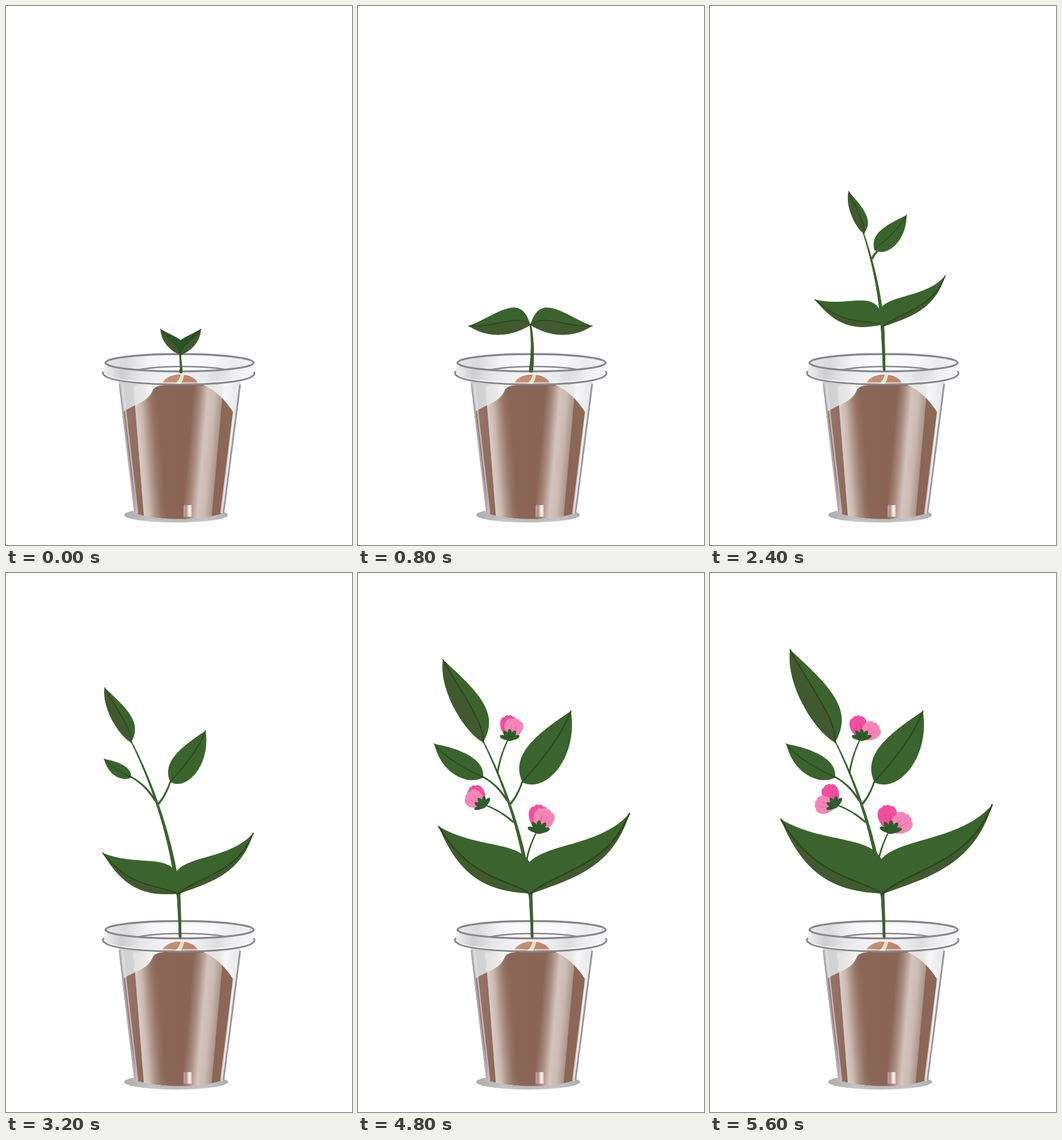
Animation of 600 by 933 pixels, one loop 6.4 s. Source, as an HTML page with a canvas:

```html
<!DOCTYPE html>
<html lang="en">
<head>
<meta charset="utf-8">
<title>Growing plant</title>
<style>
html, body { margin: 0; width: 100%; height: 100%; overflow: hidden; background: #fff; }
canvas { display: block; width: 100vw; height: 100vh; }
</style>
</head>
<body>
<canvas id="stage" width="600" height="933"></canvas>
<script>
const ctx = document.getElementById('stage').getContext('2d');
const STEP = 800, STAGES = 8, GROWTH = 27;
const GREEN = '#3b632e', OLIVE = '#41592f', VEIN = '#2b471a', CALYX = '#2f5b2b';
const LIGHT = '#f486b7', DEEP = '#ee4f9f';
const rad = degrees => degrees * Math.PI / 180;

// Bezier handles of both edges in leaf space: base at (0,0), tip at (1,0).
// The midrib lies between the edges; `rib` is its share of the upper one.
const SHAPES = {
  sprout: { up: [.15, .55, .55, .16], low: [.25, -.16, .65, -.24], rib: .5, underside: OLIVE },
  lowRight: { up: [.12, .48, .55, -.08], low: [.3, -.1, .62, -.26], rib: .2, underside: OLIVE },
  lowLeft: { up: [.22, .5, .5, .05], low: [.28, -.18, .55, -.28], rib: .22, underside: OLIVE },
  top: { up: [.2, .3, .5, .2], low: [.15, -.12, .7, -.2], rib: .55, underside: OLIVE },
  right: { up: [.18, .3, .55, .18], low: [.03, -.3, .6, -.38], rib: .5, underside: GREEN },
  small: { up: [.15, .28, .6, .18], low: [.12, -.25, .6, -.36], rib: .45, underside: GREEN }
};

const FLOWERS = [
  { root: [242, 346], head: [261, 286], bend: [246, 318], turn: 0, size: 1, side: 1 },
  { root: [269, 431], head: [219, 401], bend: [248, 412], turn: -36, size: .97, side: -1 },
  { root: [292, 500], head: [311, 446], bend: [296, 474], turn: 3, size: 1.13, side: 1 }
];

function leaf(shape, side, x, y, degrees, length, color = GREEN) {
  const { up, low, rib, underside } = shape;
  const vein = up.map((v, i) => low[i] + (v - low[i]) * rib);
  const blade = (edge, fill) => {
    ctx.beginPath();
    ctx.moveTo(0, 0);
    ctx.bezierCurveTo(...edge, 1, 0);
    ctx.bezierCurveTo(low[2], low[3], low[0], low[1], 0, 0);
    ctx.fillStyle = fill;
    ctx.fill();
  };
  ctx.save();
  ctx.translate(x, y);
  ctx.scale(side, 1);
  ctx.rotate(-rad(degrees));
  ctx.scale(length, -length);
  blade(up, color);
  if (underside !== GREEN) blade(vein, underside);
  ctx.beginPath();
  ctx.moveTo(0, 0);
  ctx.bezierCurveTo(...vein, 1, 0);
  ctx.strokeStyle = VEIN;
  ctx.lineWidth = .8 / length + .008;
  ctx.stroke();
  ctx.restore();
}

// Quadratic curve whose width runs from w0 to w1.
function stem([x0, y0], [cx, cy], [x1, y1], w0, w1) {
  const n = 30;
  const mix = (a, b, c, t) => a * (1 - t) ** 2 + 2 * b * t * (1 - t) + c * t * t;
  const at = t => [mix(x0, cx, x1, t), mix(y0, cy, y1, t)];
  ctx.strokeStyle = GREEN;
  ctx.lineCap = 'round';
  for (let i = 0; i < n; i++) {
    ctx.lineWidth = w0 + (w1 - w0) * i / n;
    ctx.beginPath();
    ctx.moveTo(...at(i / n));
    ctx.lineTo(...at((i + 1) / n));
    ctx.stroke();
  }
}

function ellipse(x, y, rx, ry, from = 0, to = Math.PI * 2) {
  ctx.beginPath();
  ctx.ellipse(x, y, rx, ry, 0, from, to);
}

function petal(degrees, length, half, color, crease) {
  const bumps = 4;
  const edge = i => [half * (2 * i / bumps - 1), -length * (.78 + .17 * Math.sin(Math.PI * i / bumps))];
  ctx.save();
  ctx.rotate(rad(degrees));
  ctx.fillStyle = color;
  ctx.beginPath();
  ctx.moveTo(0, 0);
  ctx.bezierCurveTo(-half * .7, -length * .15, -half * 1.3, -length * .5, ...edge(0));
  for (let i = 1; i <= bumps; i++) {
    const [px, py] = edge(i - .5);
    ctx.quadraticCurveTo(px, py - length * .09, ...edge(i));
  }
  ctx.bezierCurveTo(half * 1.3, -length * .5, half * .7, -length * .15, 0, 0);
  ctx.fill();
  ctx.strokeStyle = crease;
  ctx.lineWidth = .7;
  for (const k of [-.3, .3]) {
    ctx.beginPath();
    ctx.moveTo(k * half * .6, -length * .4);
    ctx.lineTo(k * half, -length * .65);
    ctx.stroke();
  }
  ctx.restore();
}

function calyx(size) {
  ctx.fillStyle = CALYX;
  for (let a = -70; a <= 70; a += 35) {
    ctx.save();
    ctx.rotate(rad(a));
    ellipse(0, -size * .58, size * .23, size * .55);
    ctx.fill();
    ctx.restore();
  }
  ellipse(0, -size * .12, size * .5, size * .3);
  ctx.fill();
}

function bud() {
  ctx.translate(0, 3);
  ctx.rotate(.2);
  ctx.fillStyle = LIGHT;
  for (let a = 0; a < 360; a += 45) {
    ellipse(1 + Math.cos(rad(a)) * 4.5, -12 + Math.sin(rad(a)) * 4.5, 4, 4);
    ctx.fill();
  }
  calyx(10.5);
}

function blossom(open) {
  ctx.translate(2, 2);
  petal(open ? -13 : -3, 43, 14, DEEP, '#d93c8b');
  petal(open ? 48 : 18, 39, 15, LIGHT, DEEP);
  calyx(16);
}

function flower({ root, head, bend, turn, size, side }, s) {
  const budding = s === 5, reach = budding ? .66 : 1;
  const grown = p => p.map((v, i) => root[i] + (v - root[i]) * reach);
  const end = grown(head), scale = budding ? 1 : size;
  stem(root, grown(bend), end, 3, 2);
  ctx.save();
  ctx.translate(...end);
  ctx.rotate(rad(turn));
  ctx.scale(side * scale, scale);
  budding ? bud() : blossom(s === 7);
  ctx.restore();
}

function sprout(s) {
  const opened = s === 1;
  const y = opened ? 552 : 604, color = opened ? GREEN : '#2b5228';
  stem([opened ? 300 : 303, 631], [305, y + 38], [299 + 3 * !opened, y], opened ? 7 : 5, 3);
  for (const side of [-1, 1]) {
    leaf(SHAPES.sprout, side, opened ? 299 : 303, y, opened ? -1 : 52, opened ? 107 : 57, color);
  }
}

function plant(s) {
  const length = (from, start, max) => Math.min(max, start + GROWTH * (s - from));
  const angle = (start, max) => Math.min(max, start + 8 * (s - 2));
  const young = s === 3, lower = length(0, 60, 246);

  stem([302, 630], [301, 590], [299, 553], 4.5, 6);
  if (young) {
    stem([299, 553], [293, 475], [266, 393], 6.5, 2);
    stem([281, 437], [285, 430], [290, 424], 3.5, 3);
  } else if (s > 3) {
    stem([299, 556], [281, 420], [217, 291], 7.5, 2);
    stem([258, 393], [242, 367], [217, 353], 3.5, 2.5);
    stem([264, 400], [277, 385], [285, 361], 3.5, 2.5);
  }

  leaf(SHAPES.lowLeft, -1, 300, 555 - 4 * young, angle(12, 36), lower * .89);
  leaf(SHAPES.lowRight, 1, 298, 556, angle(31, 39), lower);
  if (young) {
    leaf(SHAPES.top, -1, 267, 394, 70, 78);
    leaf(SHAPES.right, 1, 285, 422, 47, 82);
  } else if (s > 3) {
    leaf(SHAPES.top, -1, 217, 293, 64, length(3, 78, 178));
    leaf(SHAPES.right, 1, 285, 362, 55.6, length(3, 81, 149));
    leaf(SHAPES.small, -1, 217, 354, 34.5, length(4, 57, 103));
  }
  if (s > 4) FLOWERS.forEach(f => flower(f, s));
}

// Evenly spaced colours from x0 to x1; a number is a grey level.
function shades(x0, x1, ...colors) {
  const g = ctx.createLinearGradient(x0, 0, x1, 0);
  colors.forEach((c, i) => g.addColorStop(i / (colors.length - 1), typeof c === 'number' ? `rgb(${c},${c},${c + 2})` : c));
  return g;
}

// Slanted reflection, given by the opacity across its width.
function gleam(x0, x1, slant, ...alphas) {
  ctx.save();
  ctx.transform(1, 0, slant, 1, -slant * 657, 0);
  ctx.fillStyle = shades(x0, x1, ...alphas.map(a => `rgba(236,230,226,${a})`));
  ctx.fillRect(x0, 657, x1 - x0, 240);
  ctx.restore();
}

function wall(xTop, xBottom, color, width) {
  ctx.beginPath();
  ctx.moveTo(xTop, 655);
  ctx.lineTo(xBottom, 878);
  ctx.strokeStyle = color;
  ctx.lineWidth = width;
  ctx.stroke();
}

function arc(x, y, rx, ry, color, width, from, to) {
  ellipse(x, y, rx, ry, from, to);
  ctx.strokeStyle = color;
  ctx.lineWidth = width;
  ctx.stroke();
}

function soil() {
  ctx.beginPath();
  ctx.moveTo(201, 704);
  ctx.bezierCurveTo(222, 688, 246, 688, 255, 664);
  ctx.quadraticCurveTo(259, 657, 275, 656);
  ctx.lineTo(342, 656);
  ctx.quadraticCurveTo(370, 667, 394, 703);
  ctx.lineTo(374, 880);
  ctx.quadraticCurveTo(300, 897, 227, 880);
  ctx.fillStyle = shades(200, 396, '#97776a', '#8b6656', '#8a6555', '#8a6555', '#8d6959');
  ctx.fill();
}

function seed() {
  ctx.save();
  ctx.beginPath();
  ctx.rect(265, 632, 75, 23);
  ctx.clip();
  ellipse(302, 656, 31, 18);
  ctx.fillStyle = shades(271, 333, '#c59179', '#b8846d');
  ctx.fill();
  ctx.beginPath();
  ctx.moveTo(291, 656);
  ctx.quadraticCurveTo(301, 648, 303, 638);
  ctx.lineTo(309, 638);
  ctx.quadraticCurveTo(307, 650, 301, 656);
  ctx.fillStyle = '#efe2ce';
  ctx.fill();
  ctx.restore();
}

function cup() {
  const rim = [301, 617.5, 128.5, 15], rimGrey = '#88868d';
  ellipse(295, 881, 90, 13);
  ctx.fillStyle = shades(205, 385, 172, 196, 187, 196, 176);
  ctx.fill();

  ctx.save();
  ctx.beginPath();
  ctx.moveTo(195, 648);
  ctx.lineTo(222, 878);
  ctx.quadraticCurveTo(300, 900, 378, 878);
  ctx.lineTo(407, 648);
  ctx.fillStyle = shades(195, 407, 205, 212, 244, 249, 249, 240, 222, 246, 228);
  ctx.fill();
  ctx.clip();
  soil();
  gleam(221, 261, .08, .8, .65, .35, .1, 0);
  gleam(326, 377, -.09, 0, .3, .75, .65, .35);
  ctx.fillStyle = shades(307, 323, 'rgba(235,225,218,.6)', 'rgba(215,195,184,.35)', '#fdfaf8', 'rgba(235,225,220,.6)');
  ctx.fillRect(308, 864, 14, 20);
  ctx.restore();

  wall(197, 224, '#a9a8ae', 3);
  wall(202, 228, 'rgba(235,235,238,.6)', 2.5);
  wall(406, 377, '#98979e', 3);
  wall(401, 373, 'rgba(238,238,241,.75)', 3);
  arc(300, 877, 77, 12, '#bdbabc', 2, .1, Math.PI - .1);

  // Collar
  ctx.beginPath();
  ctx.moveTo(172, 618);
  ctx.lineTo(168, 641);
  ctx.bezierCurveTo(190, 661, 408, 661, 430, 641);
  ctx.lineTo(431, 618);
  ctx.fillStyle = shades(166, 432, 244, 206, 230, 240, 242, 238, 222, 240, 247);
  ctx.fill();
  seed();

  // Rim with the far wall seen through it
  ellipse(...rim);
  ctx.fillStyle = shades(172, 431, 230, 218, 244, 250, 250, 248, 236, 242);
  ctx.fill();
  ctx.save();
  ctx.clip();
  arc(306, 634, 84, 10, rimGrey, 2.5, Math.PI, Math.PI * 2);
  ctx.restore();
  arc(...rim, rimGrey, 3.4);

  ctx.beginPath();
  ctx.moveTo(169, 633);
  ctx.bezierCurveTo(150, 661, 448, 664, 430, 633);
  ctx.strokeStyle = rimGrey;
  ctx.lineWidth = 3;
  ctx.stroke();
  arc(299, 636, 128, 16.5, 'rgba(252,252,253,.75)', 1.8, .3, Math.PI - .3);
}

function draw(s) {
  ctx.fillStyle = '#fff';
  ctx.fillRect(0, 0, 600, 933);
  cup();
  s < 2 ? sprout(s) : plant(s);
}

let shown = -1;
function tick() {
  const s = Math.floor(performance.now() / STEP) % STAGES;
  if (s !== shown) draw(shown = s);
  requestAnimationFrame(tick);
}
tick();
</script>
</body>
</html>
```
